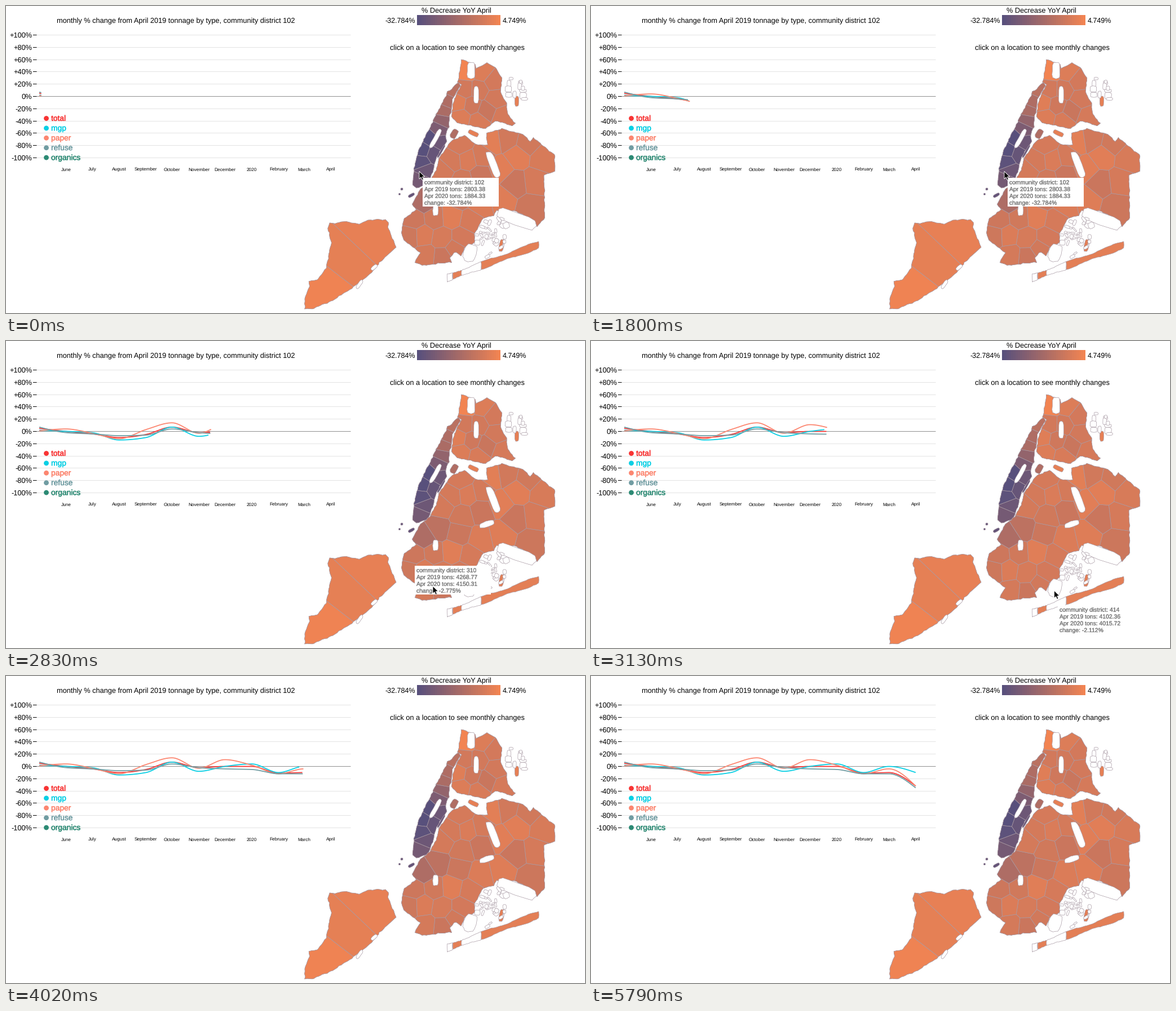
A matplotlib script that plays this animation: 1027 px wide and 545 px high, repeating every 5.89 s.

```python
import numpy as np
import matplotlib.pyplot as plt
from matplotlib.animation import FuncAnimation
from matplotlib.patches import Circle, Polygon, Rectangle
from matplotlib.patheffects import Normal, Stroke

W, H, DPI = 1027, 545, 64
PX = 72 / DPI
FRAMES, INTERVAL = 190, 31
STEP_MS = 148.3
LOW, HIGH = np.array([88, 80, 124]) / 255, np.array([242, 132, 82]) / 255
BORDER = "#aa9ca6"

plt.rcParams["font.family"] = "Liberation Sans"
plt.rcParams["text.hinting"] = "none"
rng = np.random.default_rng(4)
fig = plt.figure(figsize=(W / DPI, H / DPI), dpi=DPI, facecolor="white")
ax = fig.add_axes([0, 0, 1, 1])
ax.set(xlim=(0, W), ylim=(H, 0))
ax.axis("off")


def shade(v):
    return LOW + (HIGH - LOW) * np.clip(v, 0, 1)


def text(x, y, s, size=12.7, ha="left", color="black", bold=0, **kw):
    item = ax.text(x, y, s, fontsize=size * PX, ha=ha, color=color, **kw)
    if bold:
        item.set_path_effects([Stroke(linewidth=bold * PX, foreground=color), Normal()])
    return item


def area(points, color, edge=BORDER, width=0.7, **kw):
    return ax.add_patch(Polygon(points, fc=color, ec=edge, lw=width * PX, **kw))


def coast(points, rough=0.5):
    """Split an outline into short, slightly uneven pieces."""
    p = np.array(points, float)
    out = []
    for a, b in zip(p, np.roll(p, -1, axis=0)):
        n = max(1, int(np.hypot(*(b - a)) / 4))
        out += [a + (b - a) * k / n + rng.normal(0, rough, 2) for k in range(n)]
    return np.array(out)


def blob(x, y, w, h, angle=0, color="white"):
    """A boxy, slightly uneven ellipse for parks, bays and small islands."""
    t = np.linspace(0, 2 * np.pi, 17)[:-1]
    c, s = np.cos(t), np.sin(t)
    u = w / 2 * np.sign(c) * abs(c) ** 0.6 + rng.normal(0, w * 0.02, 16)
    v = h / 2 * np.sign(s) * abs(s) ** 0.6 + rng.normal(0, h * 0.02, 16)
    a = np.radians(angle)
    area(np.c_[x + u * np.cos(a) - v * np.sin(a), y + u * np.sin(a) + v * np.cos(a)], color)


def cell(i, sites):
    """Region nearer to site i than to any other site."""
    poly = sites[i] + 400 * np.array([[-1, -1], [1, -1], [1, 1], [-1, 1]])
    for other in np.delete(sites, i, axis=0):
        side = (poly - (sites[i] + other) / 2) @ (other - sites[i])
        kept = []
        for a, b, da, db in zip(poly, np.roll(poly, -1, 0), side, np.roll(side, -1)):
            if da <= 0:
                kept.append(a)
            if da * db < 0:
                kept.append(a + (b - a) * da / (da - db))
        poly = np.array(kept)
    return poly


def borough(outline, count, base, dip, depth, reach, noise):
    """Split an outline into even districts, darker around the dip."""
    shape = area(coast(outline), shade(base))
    low, high = np.min(outline, 0), np.max(outline, 0)
    spots = rng.uniform(low, high, (2500, 2))
    spots = spots[shape.get_path().contains_points(spots)]
    sites = spots[:count]
    for _ in range(12):
        near = np.argmin(((spots[:, None] - sites) ** 2).sum(2), axis=1)
        sites = np.array([spots[near == k].mean(0) for k in range(count)])
    for i, site in enumerate(sites):
        d = np.hypot(*(site - dip))
        v = base - depth * np.exp(-(d / reach) ** 2) + rng.normal(0, noise)
        area(cell(i, sites), shade(v)).set_clip_path(shape)
    area(shape.get_xy(), "none")


STATEN = [(530, 538), (531, 515), (539, 498), (537, 489), (552, 487), (568, 465), (577, 420),
          (571, 394), (575, 386), (604, 383), (626, 387), (642, 380), (672, 379), (678, 384),
          (677, 392), (692, 428), (666, 452), (645, 476), (631, 488), (606, 506), (580, 522),
          (543, 538)]
BRONX = [(808, 95), (832, 104), (834, 111), (853, 101), (868, 109), (880, 128), (877, 152),
         (887, 172), (890, 192), (903, 208), (898, 212), (868, 204), (850, 218), (800, 207),
         (790, 195), (795, 165), (808, 140), (802, 135)]
MANHATTAN = [(802, 136), (806, 142), (792, 165), (785, 214), (779, 230), (782, 240),
             (763, 269), (757, 295), (748, 316), (728, 323), (721, 317), (724, 288),
             (732, 255), (762, 195), (784, 152)]
LONG_ISLAND = [(790, 239), (812, 229), (833, 246), (854, 247), (852, 226), (880, 218),
               (917, 228), (930, 241), (935, 234), (973, 264), (974, 293), (954, 300),
               (956, 376), (942, 391), (938, 383), (905, 364), (870, 363), (865, 372),
               (846, 376), (838, 392), (830, 405), (832, 419), (813, 430), (807, 443),
               (798, 436), (788, 447), (790, 455), (738, 460), (725, 455), (734, 438),
               (706, 415), (701, 402), (706, 378), (728, 361), (720, 352), (736, 324),
               (752, 312), (764, 288), (768, 270)]

borough(STATEN, 3, 0.98, (640, 440), 0.07, 60, 0.01)
borough(BRONX, 12, 0.82, (795, 195), 0.1, 30, 0.06)
borough(MANHATTAN, 12, 0.75, (748, 272), 0.75, 90, 0.05)
borough(LONG_ISLAND, 32, 0.82, (738, 328), 0.3, 38, 0.05)

# Parks and inlets
blob(762, 235, 37, 8, -61)
blob(825, 114, 14, 29)
blob(834, 158, 9, 30)
blob(864, 281, 50, 13, 68)
blob(853, 325, 26, 10, -18)
blob(762, 363, 10, 19)
blob(906, 378, 74, 22, 20)
blob(653, 464, 13, 6, -40)
blob(627, 494, 17, 6, -55)
blob(823, 438, 22, 32, 15)

# Islets
blob(772, 258, 26, 3, -60, shade(0.1))
blob(719, 336, 12, 5, -30, shade(0.08))
blob(702, 325, 4, 4, 0, shade(0.08))
blob(698, 334, 3, 3, 0, shade(0.08))
blob(829, 226, 19, 8, 25, shade(0.92))
blob(795, 227, 17, 11, -60, shade(0.57))
blob(906, 169, 7, 18, 0, shade(0.92))
blob(919, 160, 4, 11, 0, shade(0.92))
blob(879, 425, 8, 22, 10, shade(0.9))
for _ in range(12):
    blob(*rng.uniform((882, 128), (920, 165)), *rng.uniform(4, 13, 2))
for _ in range(38):
    blob(*rng.normal((864, 407), (17, 14)), *rng.uniform(2, 11, 2), rng.uniform(0, 90))

# Barrier spit, part white and part filled
for x0, x1, color in ((783, 792, "white"), (792, 808, shade(0.9)),
                      (808, 843, "white"), (843, 945, shade(0.9))):
    x = np.linspace(x0, x1, 12)
    y = 483 - (x - 783) * 0.365
    half = 6 + 1.5 * np.sin(x / 12)
    area(coast(np.r_[np.c_[x, y - half], np.c_[x, y + half][::-1]], 0.3), color)

# Legend bar and headings
for k in range(37):
    ax.add_patch(Rectangle((729 + 4 * k, 16), 4, 18, fc=shade(k / 36), lw=0))
text(799, 12, "% Decrease YoY April", ha="center")
text(725.5, 30, "-32.784%", 12.5, "right")
text(881, 30, "4.749%", 12.5)
text(800.5, 78, "click on a location to see monthly changes", ha="center")
text(301.5, 30, "monthly % change from April 2019 tonnage by type, community district 102",
     12.8, "center")


# Chart
def pct_y(pct):
    return 160.5 - 1.089 * np.asarray(pct, float)


for pct in range(-100, 101, 20):
    y = np.floor(pct_y(pct)) + 0.5
    ax.plot([55, 611], [y, y], color="#e3e3e3" if pct else "#8f8f8f", lw=PX, snap=False)
    ax.plot([48.5, 54], [y, y], color="black", lw=PX, snap=False)
    text(46, y + 4.5, f"{pct:+d}%" if pct else "0%", ha="right")

MONTHS = "June July August September October November December 2020 February March April"
DAYS = np.cumsum([0, 31, 30, 31, 31, 30, 31, 30, 31, 31, 29, 31])
month_x = 59 + 517 * DAYS / DAYS[-1]
for x, month in zip(month_x[1:], MONTHS.split()):
    text(x, 292.5, month, 8.2, "center")

SERIES = [
    ("total", "#f83434", [5, 0, -4, -10, -5, 7, -2, 0, 0, -11, -10, -32]),
    ("mgp", "#08cfe4", [2, 0, -2, -14, -10, 7, -8, 0, 4, -10, 0, -10]),
    ("paper", "#fc8670", [1, 4, -3, -12, 3, 14, -3, 11, 2, -12, -4, -32]),
    ("refuse", "#709ca2", [7, -2, -4, -7, -6, 4, -2, -4, -5, -12, -12, -35]),
    ("organics", "#2c8a74", None),
]


def monotone_curve(x, y, n=24):
    h, s = np.diff(x), np.diff(y) / np.diff(x)
    p = (s[:-1] * h[1:] + s[1:] * h[:-1]) / (h[:-1] + h[1:])
    m = (np.sign(s[:-1]) + np.sign(s[1:])) * np.minimum(
        np.minimum(abs(s[:-1]), abs(s[1:])), abs(p) / 2)
    m = np.r_[(3 * s[0] - m[0]) / 2, m, (3 * s[-1] - m[-1]) / 2]
    u = np.linspace(0, 1, n, endpoint=False)[None]
    h, y0, y1 = h[:, None], y[:-1, None], y[1:, None]
    ys = (y0 * (1 + 2 * u) * (1 - u) ** 2 + y1 * u * u * (3 - 2 * u)
          + h * (m[:-1, None] * u * (1 - u) ** 2 - m[1:, None] * u * u * (1 - u)))
    xs = x[:-1, None] + h * u
    return np.r_[xs.ravel(), x[-1]], np.r_[ys.ravel(), y[-1]]


curves = []
for k, (name, color, values) in enumerate(SERIES):
    y = 199.5 + 17.4 * k
    ax.add_patch(Circle((71.5, y), 4.4, fc=color, lw=0, zorder=4))
    text(80, y + 4.3, name, 13.8, color=color, bold=0.45, zorder=4)
    if values:
        cx, cy = monotone_curve(month_x, pct_y(values))
        length = np.r_[0, np.cumsum(np.hypot(np.diff(cx), np.diff(cy)))]
        line, = ax.plot([], [], color=color, lw=1.8 * PX, zorder=3, solid_capstyle="butt")
        curves.append((line, cx, cy, length))

# Tooltip and pointer
tip_box = ax.add_patch(Rectangle((0, 0), 135, 50.5, fc="white", lw=0, zorder=10))
tip_lines = [text(0, 0, "", 10.4, color="#7c7c7c", bold=0.25, zorder=11) for _ in range(4)]
ARROW = np.array([[0, 0], [0, 13.5], [3.1, 10.6], [5.2, 15.4], [7.5, 14.4],
                  [5.4, 9.7], [9.6, 9.5]])
pointer = area(ARROW, "black", "white", 0.9, zorder=12)

# step, x, y
POINTER = np.array([(14, 733, 293.5), (17, 716, 344), (19, 757, 435), (23, 886, 451),
                    (26, 908, 538)]).T
# first step, box corner, district, tons before and after
TIPS = [(0, 739, 305, 102, 2803.38, 1884.33), (16, 739, 312, 101, 2024.97, 1445.48),
        (18, 725, 399, 310, 4268.77, 4150.31), (21, 828, 469, 414, 4102.36, 4015.72)]


def ease_cubic(u):
    return 4 * u ** 3 if u < 0.5 else 1 - 4 * (1 - u) ** 3


def show_tip(step):
    visible = step < 23
    tip_box.set_visible(visible)
    _, x, y, code, before, after = [tip for tip in TIPS if tip[0] <= step][-1]
    tip_box.set_xy((x, y))
    rows = (f"community district: {code}", f"Apr 2019 tons: {before:.2f}",
            f"Apr 2020 tons: {after:.2f}", f"change: {(after / before - 1) * 100:.3f}%")
    for k, (item, row) in enumerate(zip(tip_lines, rows)):
        item.set_visible(visible)
        item.set_text(row)
        item.set_position((x + 3, y + 11.5 + 12.1 * k))


def update(i):
    step = min(39, int((i * INTERVAL + 24) / STEP_MS))
    part = ease_cubic(0.12 + 0.0215 * step)
    for line, cx, cy, length in curves:
        end = part * length[-1]
        n = np.searchsorted(length, end)
        line.set_data(np.r_[cx[:n], np.interp(end, length, cx)],
                      np.r_[cy[:n], np.interp(end, length, cy)])
    show_tip(step)
    pointer.set_visible(step <= POINTER[0, -1])
    pointer.set_xy(ARROW + [np.interp(step, POINTER[0], row) for row in POINTER[1:]])
    return []


anim = FuncAnimation(fig, update, frames=FRAMES, interval=INTERVAL, repeat=True,
                     repeat_delay=0, blit=False)
plt.show()
```
